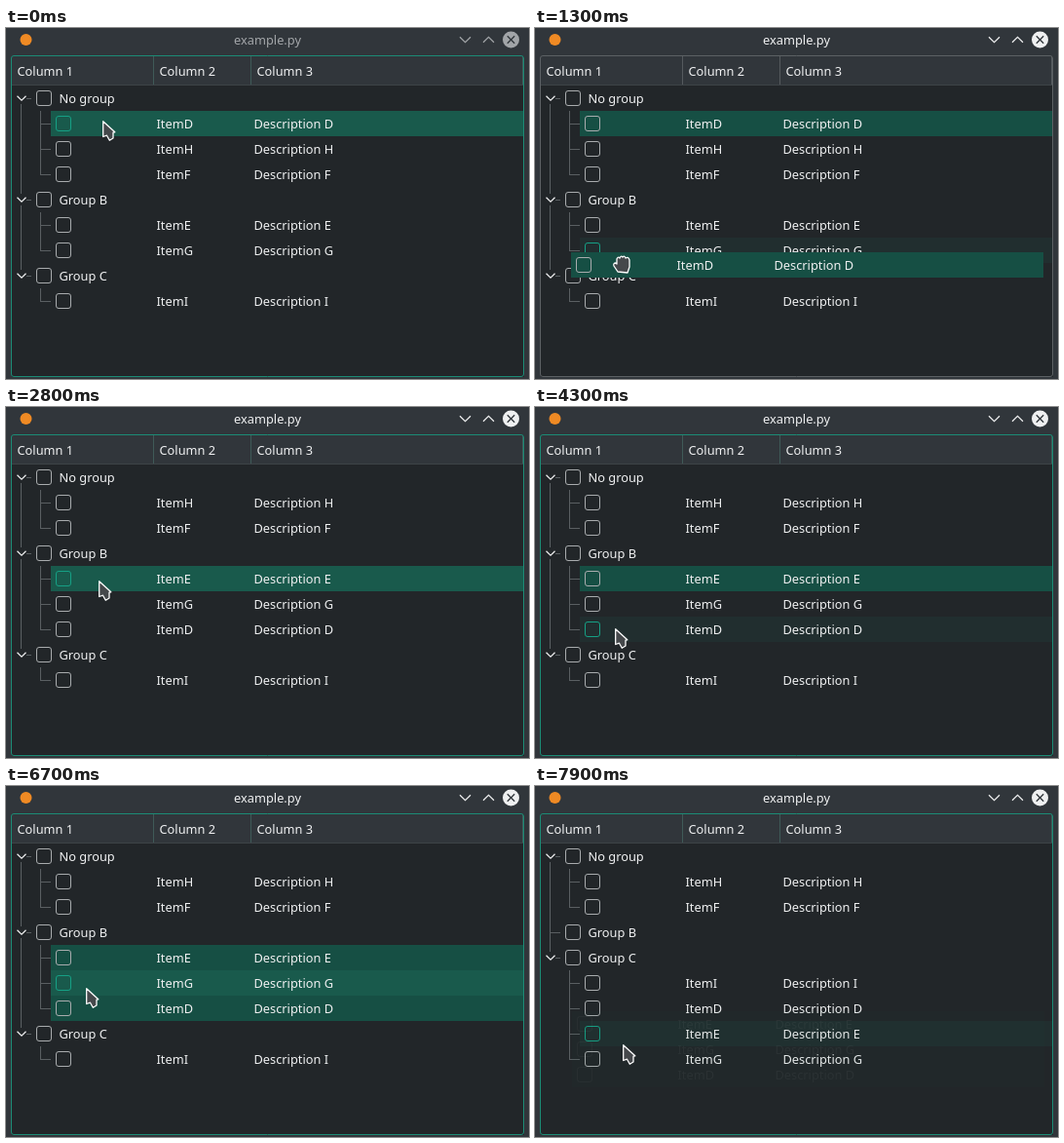
Animation of 537 by 360 pixels, one loop 8000 ms. Source, as an HTML page with a canvas:

```html
<!DOCTYPE html>
<html lang="en">
<head>
<meta charset="utf-8">
<title>example.py</title>
<style>
  html, body { margin: 0; width: 100%; height: 100%; overflow: hidden; background: #31363b; }
  canvas { display: block; }
</style>
</head>
<body>
<canvas id="stage" width="537" height="360"></canvas>
<script>
const ctx = document.getElementById('stage').getContext('2d');
const LOOP = 8000, STEP = 100, ROW = 26, TOP = 59;
const COLOR = {
  window: '#31363b', view: '#222629', text: '#eff0f1', dim: '#a1a4a7',
  box: '#a9acae', accent: '#16a085', focus: '#1c8b75', frame: '#5c6164', branch: '#5a5f62',
  selected: '#164f44', selectedHover: '#195a4c', hover: '#212e2f'
};

// Each state lasts until the next one begins.
const trees = [
  [0, { 'No group': 'DHF', 'Group B': 'EG', 'Group C': 'I' }],
  [2100, { 'No group': 'HF', 'Group B': 'EGD', 'Group C': 'I' }],
  [7600, { 'No group': 'HF', 'Group B': '', 'Group C': 'IDEG' }]
];
const selections = [
  [0, 'D'], [2100, ''], [2800, 'E'], [4800, 'EGD'], [5700, 'E'], [6500, 'EGD'], [7600, '']
];
const drags = [
  { start: 400, drop: 2100, items: 'D', row: 1, press: [99, 95] },
  { start: 6900, drop: 7600, items: 'EGD', row: 4, press: [98, 197] }
];
// time, x, y of the pointer
const path = [
  [0, 99, 95], [300, 99, 95], [400, 97, 108], [600, 86, 172], [800, 81, 219], [1100, 84, 250],
  [1200, 86, 252], [1300, 90, 240], [1500, 103, 187], [1600, 106, 168], [1700, 106, 174],
  [1800, 105, 174], [2100, 105, 174], [2600, 95, 178], [3000, 95, 178], [3400, 84, 207],
  [3500, 84, 207], [3700, 82, 219], [4200, 82, 219], [4300, 82, 227], [4900, 82, 227],
  [5200, 88, 164], [5300, 88, 169], [6100, 88, 169], [6400, 84, 226], [6600, 84, 226],
  [6700, 82, 207], [6800, 98, 197], [6900, 98, 205], [7000, 96, 228], [7200, 90, 265], [8000, 90, 265]
];

const current = (states, t) => states.filter(([start]) => start <= t).pop()[1];

function pointerAt(t) {
  const i = path.findIndex(key => key[0] > t);
  const [t0, x0, y0] = path[i - 1], [t1, x1, y1] = path[i];
  const k = (t - t0) / (t1 - t0);
  return [Math.round(x0 + (x1 - x0) * k), Math.round(y0 + (y1 - y0) * k)];
}

function rect(x, y, w, h, color) {
  ctx.fillStyle = color;
  ctx.fillRect(x, y, w, h);
}

function text(string, x, y, color = COLOR.text, align = 'left') {
  ctx.font = '12.8px "Noto Sans", sans-serif';
  ctx.textAlign = align;
  ctx.fillStyle = color;
  ctx.fillText(string, x, y);
}

function line(points, color, width = 1) {
  ctx.beginPath();
  points.forEach(([x, y]) => ctx.lineTo(x, y));
  ctx.strokeStyle = color;
  ctx.lineWidth = width;
  ctx.stroke();
}

function roundBox(x, y, w, h, radius, color) {
  ctx.beginPath();
  ctx.roundRect(x, y, w, h, radius);
  ctx.strokeStyle = color;
  ctx.lineWidth = 1;
  ctx.stroke();
}

function disc(x, y, r, color) {
  ctx.beginPath();
  ctx.arc(x, y, r, 0, 7);
  ctx.fillStyle = color;
  ctx.fill();
}

function chevron(x, y, w, h, color) {
  line([[x - w, y - h], [x, y + h], [x + w, y - h]], color, 1.2);
}

const checkbox = (x, mid, color) => roundBox(x + 0.5, mid - 7.5, 15, 15, 2.5, color);

function itemRow(letter, x, top, background, boxColor = COLOR.box) {
  if (background) rect(x, top, 485, ROW, background);
  checkbox(x + 5, top + 13, boxColor);
  text('Item' + letter, x + 108.5, top + 17.5);
  text('Description ' + letter, x + 208.5, top + 17.5);
}

function titleBar(t) {
  ctx.globalAlpha = t < 300 ? 0.6 : t < 400 ? 0.8 : 1;
  text('example.py', 268.5, 17, COLOR.text, 'center');
  chevron(471.5, 12, 5.5, 2.75, COLOR.text);
  chevron(495.5, 12, 5.5, -2.75, COLOR.text);
  disc(518.5, 12, 8.5, COLOR.text);
  ctx.globalAlpha = 1;
  line([[514.8, 8.3], [522.2, 15.7]], COLOR.window, 1.3);
  line([[514.8, 15.7], [522.2, 8.3]], COLOR.window, 1.3);
  disc(20.5, 12, 6, '#ef8a24');
}

function frame(focused) {
  rect(6, 29, 526, 329, COLOR.view);
  rect(6, 29, 525, 29, COLOR.window);
  rect(6, 58, 525, 1, '#3d4347');
  [151, 251, 530].forEach(x => rect(x, 29, 1, 29, focused ? '#3f5a58' : '#555a5e'));
  [11.5, 157.5, 257.5].forEach((x, i) => text('Column ' + (i + 1), x, 49));
  roundBox(5.5, 28.5, 526, 329, 2.5, focused ? COLOR.focus : COLOR.frame);
}

function groupRow(name, top, children, hovered, first, last) {
  const mid = top + 13;
  if (hovered) rect(26, top, 505, ROW, COLOR.hover);
  if (!first) rect(15, top, 1, children ? 7 : 13, COLOR.branch);
  if (!last) {
    const from = children ? mid + 6 : mid;
    rect(15, from, 1, top + ROW * (children + 1) - from, COLOR.branch);
  }
  const stub = children ? 21 : 16;
  rect(stub, mid, 26 - stub, 1, COLOR.branch);
  if (children) chevron(16, mid, 4.5, 2.25, COLOR.text);
  checkbox(31, mid, hovered ? COLOR.accent : COLOR.box);
  text(name, 54.5, top + 17.5);
}

function treeView(t, pointerY, dragging) {
  const groups = Object.entries(current(trees, t));
  const selected = current(selections, t);
  const isOver = top => pointerY >= top && pointerY < top + ROW;
  let top = TOP;
  groups.forEach(([name, letters], g) => {
    const over = isOver(top);
    groupRow(name, top, letters.length, over, g === 0, g === groups.length - 1);
    if (over && dragging) roundBox(26.5, top + 104.5 - 104, 126, 25, 0, '#fcfcfc');
    top += ROW;
    [...letters].forEach((letter, i) => {
      const hovered = isOver(top), picked = selected.includes(letter);
      const background = picked ? (hovered ? COLOR.selectedHover : COLOR.selected)
                                : hovered && COLOR.hover;
      rect(35, top, 1, i === letters.length - 1 ? 13 : ROW, COLOR.branch);
      rect(35, top + 13, 11, 1, COLOR.branch);
      itemRow(letter, 46, top, background, hovered ? COLOR.accent : COLOR.box);
      top += ROW;
    });
  });
}

function dragImage(drag, t) {
  const [x, y] = pointerAt(Math.min(t, drag.drop));
  const left = 46 + x - drag.press[0];
  const top = TOP + drag.row * ROW + y - drag.press[1];
  const alpha = t < drag.drop ? 1 : 0.77 - (t - drag.drop) * 0.0024;
  if (alpha <= 0) return;
  ctx.globalAlpha = alpha;
  [...drag.items].forEach((letter, i) => itemRow(letter, left, top + i * ROW, COLOR.selected));
  ctx.globalAlpha = 1;
}

function cursor(x, y, shape) {
  ctx.save();
  ctx.translate(x, y);
  ctx.lineJoin = 'round';
  ctx.lineWidth = 1.3;
  ctx.strokeStyle = '#fcfcfc';
  ctx.fillStyle = '#45484b';
  const outline = new Path2D(shape);
  ctx.fill(outline);
  ctx.stroke(outline);
  ctx.restore();
}
const ARROW = 'M.7 .7V16.5L4.5 15.2L7.3 20.2L11 18V12.2L12.8 11.8Z';
const FIST = 'M-5 10L-9 4Q-10 1-7 1L-6 2V-3Q-5-6-3-4Q-2-7 0-5Q2-7 3-4Q6-6 7-2V5L5 11Z';

function draw(t) {
  const [x, y] = pointerAt(t);
  const dragging = drags.some(drag => t >= drag.start && t < drag.drop);
  rect(0, 0, 537, 360, COLOR.window);
  titleBar(t);
  frame(!dragging);
  treeView(t, y, dragging);
  drags.filter(drag => t >= drag.start).forEach(drag => dragImage(drag, t));
  cursor(x, y, dragging ? FIST : ARROW);
}

function tick() {
  const t = performance.now() % LOOP;
  draw(Math.floor(t / STEP) * STEP);
  requestAnimationFrame(tick);
}
tick();
</script>
</body>
</html>
```
